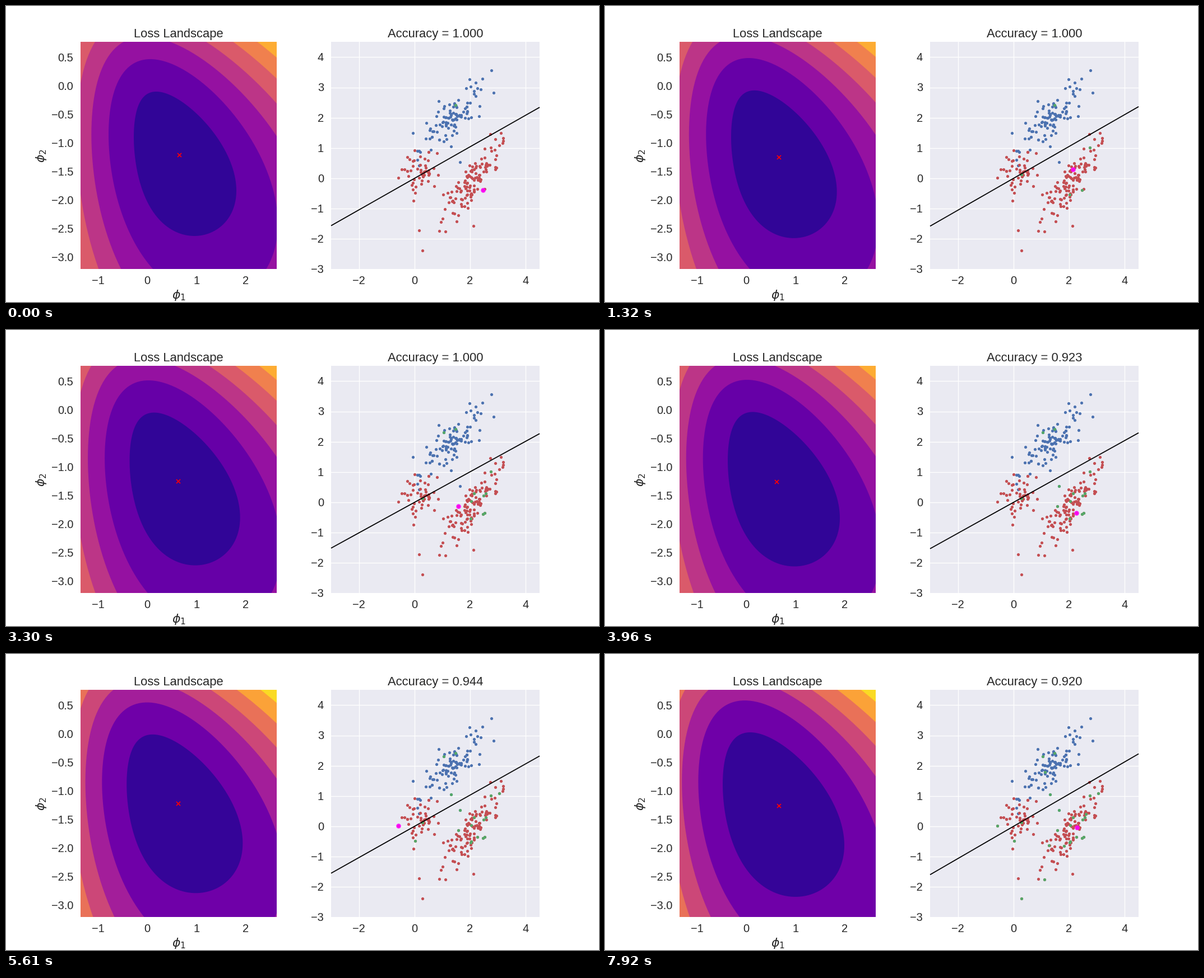
Recreate the animation shown at these times as a matplotlib script. Size 1058 by 529 pixels, loop 8000 ms.

```python
import numpy as np
import matplotlib.pyplot as plt
from matplotlib.animation import FuncAnimation
from matplotlib.patches import Polygon, Rectangle

W, H = 1058, 529
PT = 0.72                     # points per pixel at 100 dpi
STEP, TICK, LOOP = 330, 40, 8000
LAST_STEP = LOOP // STEP
INK = "#262626"
BLUE, RED, GREEN = "#4c72b0", "#c44e52", "#55a868"

plt.rcParams["font.family"] = "Liberation Sans"
plt.rcParams["mathtext.fontset"] = "dejavusans"

fig = plt.figure(figsize=(W / 100, H / 100), dpi=100, facecolor="white")
ax = fig.add_axes([0, 0, 1, 1])
ax.set_xlim(0, W)
ax.set_ylim(H, 0)
ax.axis("off")


def label(x, y, s, size=20, ha="center", va="baseline", **kw):
    return ax.text(x, y, s, size=size * PT, ha=ha, va=va, color=INK, **kw)


def number(v, digits=0):
    return f"{v:.{digits}f}".replace("-", "\u2212")


def dots(points, color, size=5.2, **kw):
    return ax.scatter(*np.transpose(points), s=(size * PT) ** 2,
                      c=color, linewidths=0, **kw)


# Loss panel: nested egg-shaped level sets
L, R, T, B = 133, 483, 64, 470
LEVELS = 6
COS_PSI = 0.372
PSI = np.arccos(COS_PSI)
ANGLE = np.linspace(0, 2 * np.pi, 140, endpoint=False)


def egg(m, progress):
    """Outline of level m; its extremes spread with the level and in time."""
    grow = progress * (1 - 0.08 * m)
    top_x = 268 - 10.5 * m - 9 * grow
    top = 153 - 58 * m ** 0.76 - 13 * grow
    left = 228 - 45 * m ** 0.75 - 18 * grow
    right = 411 + 74 * m ** 0.95 + 16 * grow
    bottom = 411 + 113 * m ** 0.83 + 23 * grow

    w, h = (right - left) / 2, (bottom - top) / 2
    mid_x, mid_y = (left + right) / 2, (top + bottom) / 2
    d = (mid_x - top_x - w * COS_PSI) / (1 - np.cos(2 * PSI))
    x = mid_x - d + w * np.cos(ANGLE) + d * np.cos(2 * ANGLE)
    y = mid_y + h * np.cos(ANGLE - PSI)
    return np.column_stack([x, y])


panel = ax.add_patch(Rectangle((L, T), R - L, B - T, lw=0, zorder=1))
bands = []
for m in range(LEVELS):
    band = ax.add_patch(Polygon(egg(m, 0), lw=0, zorder=1.4 - 0.05 * m))
    band.set_clip_path(panel)
    bands.append(band)

cross, = ax.plot([], [], "x", color="red", ms=7 * PT, mew=1.7 * PT, zorder=3)
label(307.5, 56, "Loss Landscape", 22)
for v in range(-1, 3):
    label(252 + 88 * v, 497, number(v))
for v in np.arange(-3, 0.6, 0.5):
    label(120, 150.4 - 102 * v, number(v, 1), ha="right")
label(308, 517, r"$\phi_1$", 22, va="center")
label(63, 268, r"$\phi_2$", 22, va="center", rotation=90)

# Data panel
X0, X1, Y0, Y1 = 580, 952, 64, 470


def px(v):
    return 728.6 + 49.53 * v


def py(v):
    return 308 - 54.13 * v


ax.add_patch(Rectangle((X0, Y0), X1 - X0, Y1 - Y0, fc="#eaeaf2", lw=0, zorder=1))
for v in (-2, 0, 2, 4):
    ax.plot([px(v)] * 2, [Y0, Y1], color="white", lw=1.3 * PT, zorder=1.5)
    label(px(v), 497, number(v))
for v in range(-3, 5):
    if v > -3:
        ax.plot([X0, X1], [py(v)] * 2, color="white", lw=1.3 * PT, zorder=1.5)
    label(567, py(v) + 6.8, number(v), ha="right")
title = label(766.5, 56, "", 22)

rng = np.random.default_rng(7)


def cloud(n, center, spread, tilt):
    u, v = np.clip(rng.normal(size=(2, n)), -2, 2)
    x = center[0] + spread[0] * u
    y = center[1] + spread[1] * (tilt * u + np.sqrt(1 - tilt ** 2) * v)
    return np.column_stack([x, y])


# points in the order they are queried
queried = np.array([
    (802, 177), (851, 329), (865, 253), (743, 301), (829, 337), (835, 291.5),
    (830, 306), (852, 296), (854, 327), (856, 292), (781, 183), (807, 315),
    (810, 279), (841, 327), (794, 251), (730, 334), (830, 335), (880, 249),
    (699.5, 307), (785, 211), (792, 342), (743, 437), (819, 343), (784, 403),
    (858, 286), (842, 310)])
is_blue = (queried[:, 0] < 840) & (queried[:, 1] < 285)
blue_strays = [(827, 131), (870, 155), (726, 227), (737, 285), (772, 170)]
red_strays = [(737, 401), (834, 393), (864, 229), (727, 348), (706, 292)]

dots(np.vstack([queried[is_blue], blue_strays,
                cloud(96, (800, 200), (33, 36), -0.85)]), BLUE, zorder=2)
dots(np.vstack([queried[~is_blue], red_strays,
                cloud(46, (741, 297), (15, 19), 0.1),
                cloud(98, (829, 319), (29, 37), -0.85)]), RED, zorder=2)
seen = dots(queried[:1], GREEN, zorder=2.5)
query = dots(queried[1:2], "magenta", 8.6, alpha=0.88, zorder=4)
border, = ax.plot([], [], color="black", lw=1.8 * PT, zorder=3,
                  solid_capstyle="butt")

# key poses of the estimate and of the decision border
KEYS = [0, 4, 8, 12, 17, 21, 24]
PHI_X = [309, 310, 307.3, 306.3, 307.3, 307.3, 310]
PHI_Y = [266, 269.5, 269.5, 271, 267, 269.5, 271]
SLOPE = [0.521, 0.526, 0.498, 0.510, 0.516, 0.510, 0.532]


def update(i):
    k = (i * TICK + 30) // STEP
    shades = 8 if k < 15 else 7
    colors = plt.cm.plasma((np.arange(LEVELS + 1) + 0.5) / shades)
    panel.set_facecolor(colors[LEVELS])
    for m, band in enumerate(bands):
        band.set_xy(egg(m, k / LAST_STEP))
        band.set_facecolor(colors[m])

    phi_x, phi_y, slope = (np.interp(k, KEYS, v) for v in (PHI_X, PHI_Y, SLOPE))
    cross.set_data([phi_x], [phi_y])
    border.set_data([X0, X1], [py(-3 * slope), py(4.5 * slope)])
    seen.set_offsets(queried[:k + 1])
    query.set_offsets(queried[k + 1:k + 2])
    wrong = (k >= 12) + (k >= 18)
    title.set_text(f"Accuracy = {1 - wrong / (k + 1):.3f}")
    return []


anim = FuncAnimation(fig, update, frames=LOOP // TICK, interval=TICK,
                     repeat=True, repeat_delay=0, blit=False)
plt.show()
```
